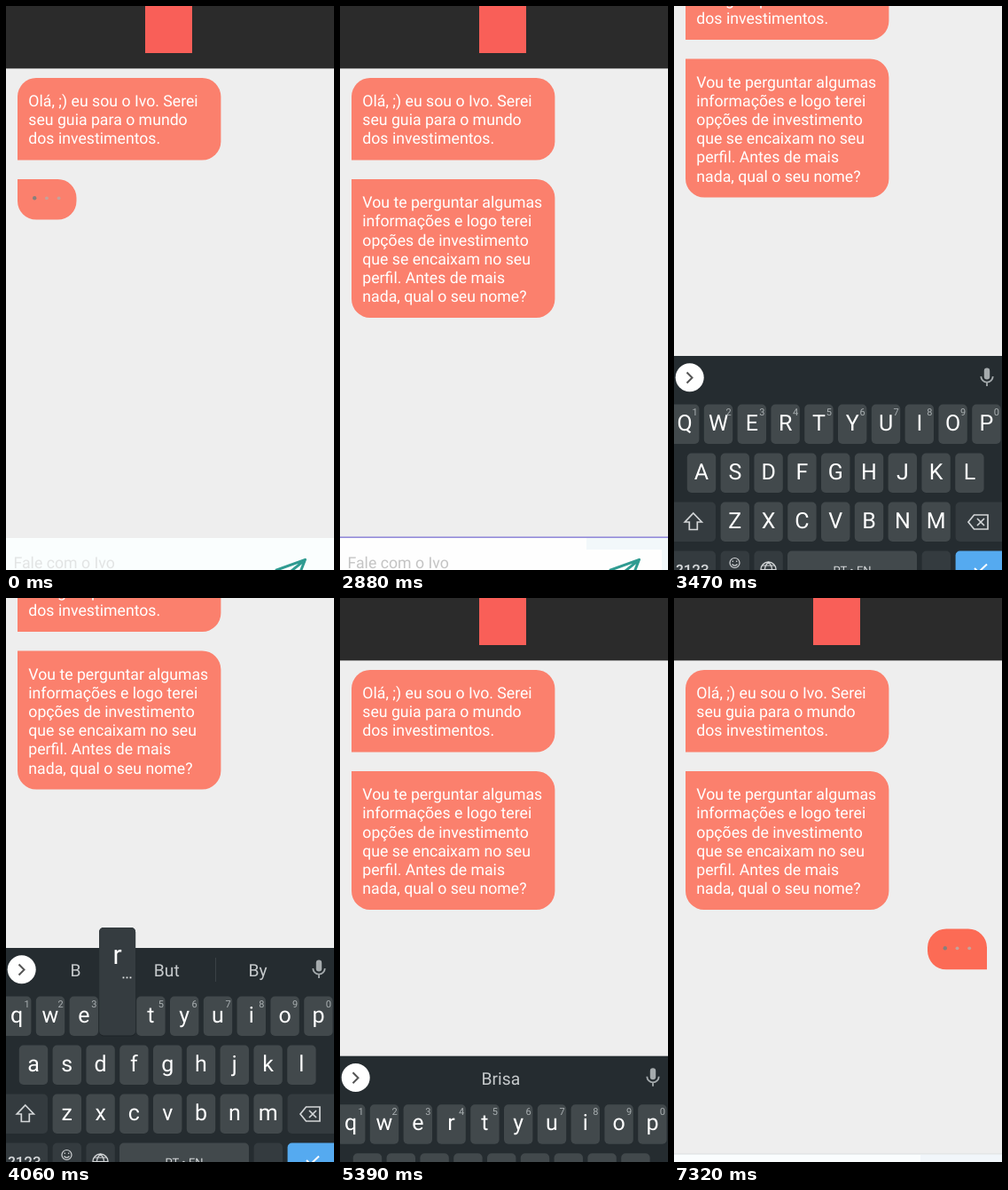
These frames come from a looping animation (370x635 px, 8 s). An HTML page:

```html
<!DOCTYPE html>
<html lang="pt">
<head>
<meta charset="utf-8">
<style>
  html, body { margin: 0; width: 100%; height: 100%; overflow: hidden; background: #eee; }
  svg { display: block; width: 370px; height: 635px; font-family: Roboto, sans-serif; }
  text { text-rendering: geometricPrecision; }
</style>
</head>
<body>
<svg id="stage" viewBox="0 0 370 635"></svg>
<script>
const LOOP = 8000;
const stage = document.getElementById('stage');

function add(parent, tag, attrs = {}, text) {
  const el = document.createElementNS('http://www.w3.org/2000/svg', tag);
  for (const k in attrs) el.setAttribute(k, attrs[k]);
  if (text !== undefined) el.textContent = text;
  parent.appendChild(el);
  return el;
}
const group = (parent, attrs) => add(parent, 'g', attrs);
const rect = (parent, x, y, width, height, fill, rx = 0) =>
  add(parent, 'rect', { x, y, width, height, fill, rx });
const label = (parent, x, y, size, fill, text, anchor = 'middle') =>
  add(parent, 'text', { x, y, 'font-size': size, fill, 'text-anchor': anchor }, text);
const line = (parent, d, stroke, width, extra = {}) =>
  add(parent, 'path', { d, stroke, 'stroke-width': width, fill: 'none', ...extra });
const show = (el, on) => el.setAttribute('display', on ? 'inline' : 'none');
const move = (el, y) => el.setAttribute('transform', `translate(0 ${y})`);

// Speech bubble with corner radii in the order tl, tr, br, bl
function bubble(parent, x, y, w, h, [a, b, c, d], fill) {
  add(parent, 'path', { fill, d:
    `M${x + a} ${y}h${w - a - b}a${b} ${b} 0 0 1 ${b} ${b}v${h - b - c}` +
    `a${c} ${c} 0 0 1 ${-c} ${c}h${c + d - w}a${d} ${d} 0 0 1 ${-d} ${-d}` +
    `v${a + d - h}a${a} ${a} 0 0 1 ${a} ${-a}z` });
}
function lines(parent, y, rows) {
  rows.forEach((row, i) => label(parent, 25.3, y + i * 21.2, 17.7, '#fff', row, 'start'));
}
function dots(parent, x, y) {
  return [0, 1, 2].map(i => add(parent, 'circle', { cx: x + i * 13.7, cy: y }));
}
function lightDot(list, active) {
  list.forEach((dot, i) => {
    dot.setAttribute('r', i === active ? 2.2 : 1.9);
    dot.setAttribute('fill', i === active ? '#87807c' : '#c4a29b');
  });
}

// Conversation
const CORAL = '#fb806d', R = 21;
rect(stage, 0, 0, 370, 635, '#eee');
const chat = group(stage);
rect(chat, 0, 0, 370, 70.4, '#2b2b2b');
rect(chat, 157, 0, 53, 53, '#f95f58');
bubble(chat, 13, 81, 229.4, 92.5, [R, R, R, 0], CORAL);
lines(chat, 113, ['Olá, ;) eu sou o Ivo. Serei', 'seu guia para o mundo', 'dos investimentos.']);

const waiting = group(chat);
bubble(waiting, 13, 195, 66.5, 45.6, [0, R, R, R], CORAL);
const botDots = dots(waiting, 32.2, 216.3);

const question = group(chat);
bubble(question, 13, 195, 229.4, 156, [0, R, R, R], CORAL);
lines(question, 227.1, ['Vou te perguntar algumas', 'informações e logo terei',
  'opções de investimento', 'que se encaixam no seu', 'perfil. Antes de mais',
  'nada, qual o seu nome?']);

const reply = group(chat);
bubble(reply, 286, 372.5, 67, 45.8, [R, R, 0, R], '#fc6b55');
const userDots = dots(reply, 305.8, 394.3);

// Message field
const field = group(stage);
const fieldBack = rect(field, 0, 599, 370, 60, '#fafefe');
const tint = group(field);
rect(tint, 278, 599, 92, 13, '#f2f8fa');
rect(tint, 363, 612, 7, 40, '#f2f8fa');
const fieldEdge = rect(field, 0, 597.4, 370, 1.6, '#938cda');
const hint = label(field, 8.5, 633, 17.7, '#ddd', 'Fale com o Ivo', 'start');
line(field, 'M304 635.5L337.5 623.3L329 645M337 623.8L317 640', '#2f9b91', 3,
  { 'stroke-linejoin': 'round' });
const caret = rect(field, 8, 613, 2, 22, '#555');

const lowField = group(stage);
rect(lowField, 0, 626, 370, 9, '#fafdfe');
rect(lowField, 278, 627, 92, 8, '#f1f6fa');
rect(lowField, 0, 625.5, 370, 1, '#dcdfe2');

const blank = rect(stage, 0, 394, 370, 241, '#fefefe');

// Keyboard
const KEY = '#42494c', DIM = '#343b3f', ICON = '#d3d6d8', STEP = 37.8;
const board = group(stage);
rect(board, 0, 394, 370, 260, '#252c30');
add(board, 'circle', { cx: 17.7, cy: 418.3, r: 16, fill: '#fff' });
line(board, 'M14.5 412.5l6 6l-6 6', '#555', 2);
rect(board, 349.8, 407.5, 6.4, 13, '#a5abad', 3.2);
line(board, 'M346.3 417a6.7 6.7 0 0 0 13.4 0M353 424v4', '#a5abad', 1.8);

const dividers = group(board);
for (const x of [131, 236]) rect(dividers, x, 405, 1, 27, '#3a4145');
const words = [78.5, 181.3, 284].map(x => label(board, x, 426, 19.3, '#c6cacc', ''));

const keys = [];
const spots = {};
[['qwertyuiop', 12.2, 448.5], ['asdfghjkl', 31, 503.5], ['zxcvbnm', 68.8, 558.5]]
  .forEach(([row, x0, y], r) => [...row].forEach((ch, i) => {
    const x = x0 + i * STEP;
    rect(board, x - 16.2, y, 32.4, 44.5, KEY, 5);
    keys.push({ ch, el: label(board, x, y + 29.3, 25, '#fff', ch) });
    if (r === 0) label(board, x + 11.5, y + 12.3, 11, '#a9afb1', (i + 1) % 10);
    spots[ch] = { x, y };
  }));

rect(board, -10, 558.5, 57, 44.5, DIM, 5);
rect(board, 317.6, 558.5, 70, 44.5, DIM, 5);
line(board, 'M21.8 571l9.5 10h-5v8.5h-9v-8.5h-5z', ICON, 1.7);
line(board, 'M332 581l6.5-8h15.5v16h-15.5zM342 577l8 8M350 577l-8 8', ICON, 1.7);

for (const [x, w, fill] of [[-10, 57, DIM], [52.6, 32.4, DIM], [90.4, 32.4, DIM],
  [128, 146, KEY], [279.6, 32.4, DIM]]) rect(board, x, 613.5, w, 45, fill, 5);
const enter = rect(board, 317.6, 613.5, 70, 45, '#55aaf0', 5);
line(board, 'M339 633l4.5 4.5l9.5-9', '#fff', 2);
label(board, 21, 641, 17, ICON, '?123').setAttribute('font-weight', 500);
label(board, 201, 640, 13, ICON, 'PT • EN');
add(board, 'circle', { cx: 68.5, cy: 627, r: 5.5, fill: 'none', stroke: ICON, 'stroke-width': 1.2 });
line(board, 'M66.3 624.5v1.5M70.7 624.5v1.5M65.5 628.5q3 3 6 0', ICON, 1.2);
add(board, 'circle', { cx: 106.5, cy: 634.5, r: 8.5, fill: 'none', stroke: ICON, 'stroke-width': 1.4 });
line(board, 'M98 634.5h17M99.5 630h14M106.5 626q-8 8.5 0 17M106.5 626q8 8.5 0 17', ICON, 1.2);

const popup = group(board);
rect(popup, -20.5, -77.5, 41, 122.5, '#1d2327', 5);
rect(popup, -20.5, -77.5, 41, 121.5, '#353c40', 5);
const popupChar = label(popup, 0, -36.5, 30, '#fff', '');
for (const x of [7, 11, 15]) rect(popup, x - 1, -22, 1.8, 1.8, '#e3e5e6');

// Latest entry whose start time has passed
const at = (track, t) => track.reduce((value, [start, next]) => t >= start ? next : value, track[0][1]);

const botTrack = [[0, 0], [500, -1], [650, 1]];
const userTrack = [[0, -1], [7320, 0]];
const pressTrack = [[0, ''], [3910, 'b'], [4060, 'r'], [4210, 'i'], [4360, ''], [4500, 's'], [4650, '']];
const wordTrack = [[0, ['', '', '']], [4060, ['B', 'But', 'By']],
  [4360, ['Bri', 'Brisa', 'Brilho']], [4650, ['', 'Brisa', '']]];

function draw(t) {
  const typing = t >= 3180 && t < 5540;
  const asked = t >= 800;
  const live = asked && t < 5540;

  move(chat, t >= 3180 && t < 5250 ? -135.5 : 0);
  show(waiting, !asked);
  show(question, asked);
  show(reply, t >= 6280);
  lightDot(botDots, at(botTrack, t));
  lightDot(userDots, at(userTrack, t));

  show(field, !typing && t < 6280);
  show(lowField, t >= 6280);
  fieldBack.setAttribute('fill', live ? '#fefefe' : '#fafefe');
  hint.setAttribute('fill', live ? '#c4c4c4' : '#e2e4e4');
  show(tint, live);
  show(fieldEdge, live);
  show(caret, t >= 3030 && live);

  show(blank, t >= 3180 && t < 3330);
  show(board, t >= 3330 && t < 5540);
  move(board, t >= 5390 ? 121.7 : 0);
  for (const { ch, el } of keys) el.textContent = t < 3910 ? ch.toUpperCase() : ch;

  const suggested = at(wordTrack, t);
  words.forEach((el, i) => el.textContent = suggested[i]);
  show(dividers, suggested[0] !== '');

  const pressed = at(pressTrack, t);
  show(popup, pressed !== '');
  if (pressed) {
    const { x, y } = spots[pressed];
    popup.setAttribute('transform', `translate(${x} ${y})`);
    popupChar.textContent = pressed;
  }
  enter.setAttribute('fill', t >= 5100 ? '#2b9af0' : '#55aaf0');
}

const begin = performance.now();
function tick() {
  draw((performance.now() - begin) % LOOP);
  requestAnimationFrame(tick);
}
tick();
</script>
</body>
</html>
```
